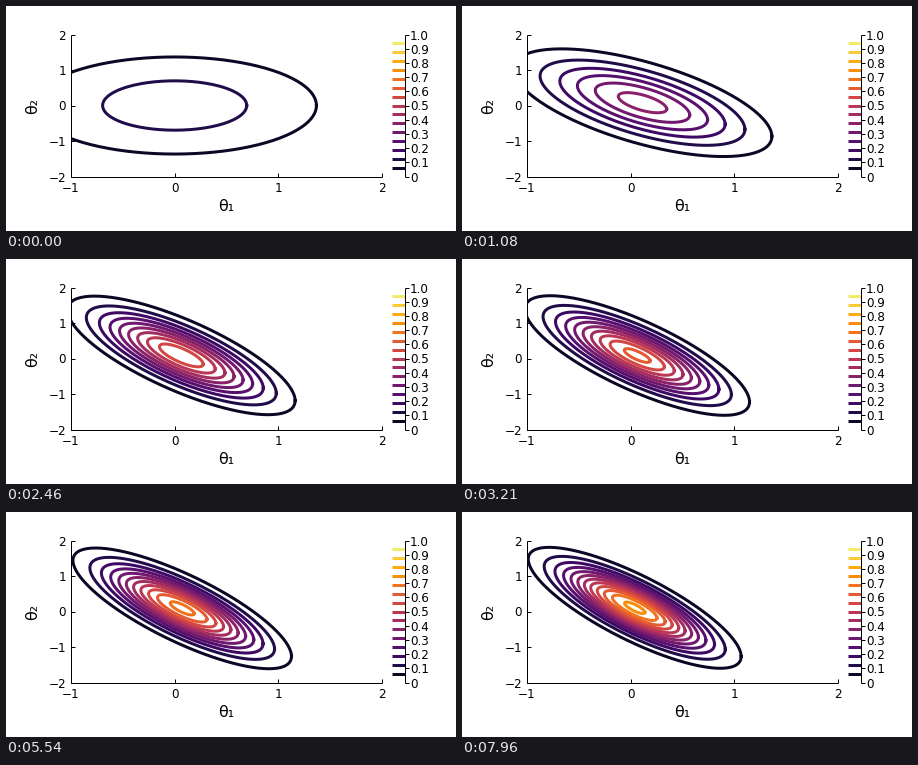
A matplotlib script for the animation above (8 s loop, 450x225 px).

```python
import numpy as np
import matplotlib
matplotlib.use("Agg") if False else None
import matplotlib.pyplot as plt
from matplotlib.animation import FuncAnimation

W, H, DPI = 450, 225, 100
PX = 72 / DPI
STEPS = 192
X0, X1, Y0, Y1 = 65, 376, 28.5, 170.5
BAR_L, BAR_R = 385.5, 398.5
LEVELS = np.arange(1, 16) / 16
INFERNO = plt.get_cmap("inferno")

# Gaussian belief at key steps: precision p11, p22, p12 and mean m1, m2
KEY_STEPS = np.array([1, 21, 26, 41, 77, 107, 160, 181, 191])
KEYS = np.array([
    [1.00, 1.00, 0.00, 0.000, 0.000],
    [3.70, 2.263, 1.725, 0.100, 0.078],
    [3.995, 2.733, 2.10, 0.115, 0.079],
    [7.61, 3.565, 3.84, 0.067, 0.090],
    [9.975, 4.126, 4.975, 0.063, 0.084],
    [11.10, 4.37, 5.48, 0.073, 0.085],
    [12.51, 4.69, 6.12, 0.072, 0.093],
    [13.15, 4.82, 6.39, 0.064, 0.097],
    [13.45, 4.886, 6.517, 0.039, 0.104],
])


def key_slopes(t, v):
    """Monotone slopes: harmonic mean inside, secants at the ends."""
    d = np.diff(v, axis=0) / np.diff(t)[:, None]
    a, b = d[:-1], d[1:]
    same = a * b > 0
    inner = np.where(same, 2 * a * b / np.where(same, a + b, 1), 0)
    return np.vstack([d[:1], inner, d[-1:]])


SLOPES = key_slopes(KEY_STEPS, KEYS)


def belief(step):
    step = max(step, KEY_STEPS[0])
    i = min(np.searchsorted(KEY_STEPS, step, "right") - 1, len(KEY_STEPS) - 2)
    h = KEY_STEPS[i + 1] - KEY_STEPS[i]
    s = (step - KEY_STEPS[i]) / h
    return ((2 * s**3 - 3 * s**2 + 1) * KEYS[i]
            + (3 * s**2 - 2 * s**3) * KEYS[i + 1]
            + h * (s**3 - 2 * s**2 + s) * SLOPES[i]
            + h * (s**3 - s**2) * SLOPES[i + 1])


fig = plt.figure(figsize=(W / DPI, H / DPI), dpi=DPI, facecolor="white")
plt.rcParams["font.family"] = "DejaVu Sans"

page = fig.add_axes([0, 0, 1, 1])
page.set(xlim=(0, W), ylim=(H, 0))
page.axis("off")

ax = fig.add_axes([X0 / W, 1 - Y1 / H, (X1 - X0) / W, (Y1 - Y0) / H])
ax.set(xlim=(-1, 2), ylim=(-2, 2))
ax.axis("off")


def stroke(xs, ys, color="black", width=1.0):
    page.plot(xs, ys, color=color, lw=width * PX, solid_capstyle="butt")


def label(x, y, text, size=12, **kw):
    kw = {"ha": "center", "va": "center_baseline", **kw}
    page.text(x, y, text, fontsize=size * PX, **kw)


def signed(n):
    return str(n).replace("-", "\u2212")


# main axes with inward ticks
stroke([X0, X0], [Y0, Y1 + 0.5])
stroke([X0, X1], [Y1, Y1])
for n in range(-1, 3):
    x = X0 + (n + 1) * (X1 - X0) / 3
    stroke([x, x], [Y1, Y1 - 4])
    label(x, 181, signed(n))
for n in range(-2, 3):
    y = Y1 - (n + 2) * (Y1 - Y0) / 4
    stroke([X0, X0 + 4], [y, y])
    label(60, y, signed(n), ha="right")
label(220.5, 199, "\u03b8\u2081", 16)
label(27, 99.5, "\u03b8\u2082", 16, rotation=90, va="center")

# colour scale
for level in LEVELS:
    y = Y1 - level * (Y1 - Y0)
    stroke([BAR_L, BAR_R], [y, y], INFERNO(level), 3)
stroke([BAR_R, BAR_R], [Y0, Y1])
for n in range(11):
    y = Y1 - n * (Y1 - Y0) / 10
    stroke([BAR_R, BAR_R + 4.5], [y, y])
    label(404, y, f"{n / 10:.1f}" if n else "0", ha="left")

ANGLE = np.linspace(0, 2 * np.pi, 181)
CIRCLE = np.array([np.cos(ANGLE), np.sin(ANGLE)])
rings = [ax.plot([], [], color=INFERNO(level), lw=3 * PX)[0] for level in LEVELS]


def draw(step):
    p11, p22, p12, m1, m2 = belief(step)
    cov = np.linalg.inv([[p11, p12], [p12, p22]])
    peak = np.sqrt(p11 * p22 - p12**2) / (2 * np.pi)
    shape = np.linalg.cholesky(cov) @ CIRCLE
    for level, ring in zip(LEVELS, rings):
        if level < peak:
            r = np.sqrt(2 * np.log(peak / level))
            ring.set_data(m1 + r * shape[0], m2 + r * shape[1])
        else:
            ring.set_data([], [])
    return rings


anim = FuncAnimation(fig, draw, frames=STEPS, interval=8000 / STEPS,
                     repeat=True, repeat_delay=0, blit=False)
plt.show()
```
